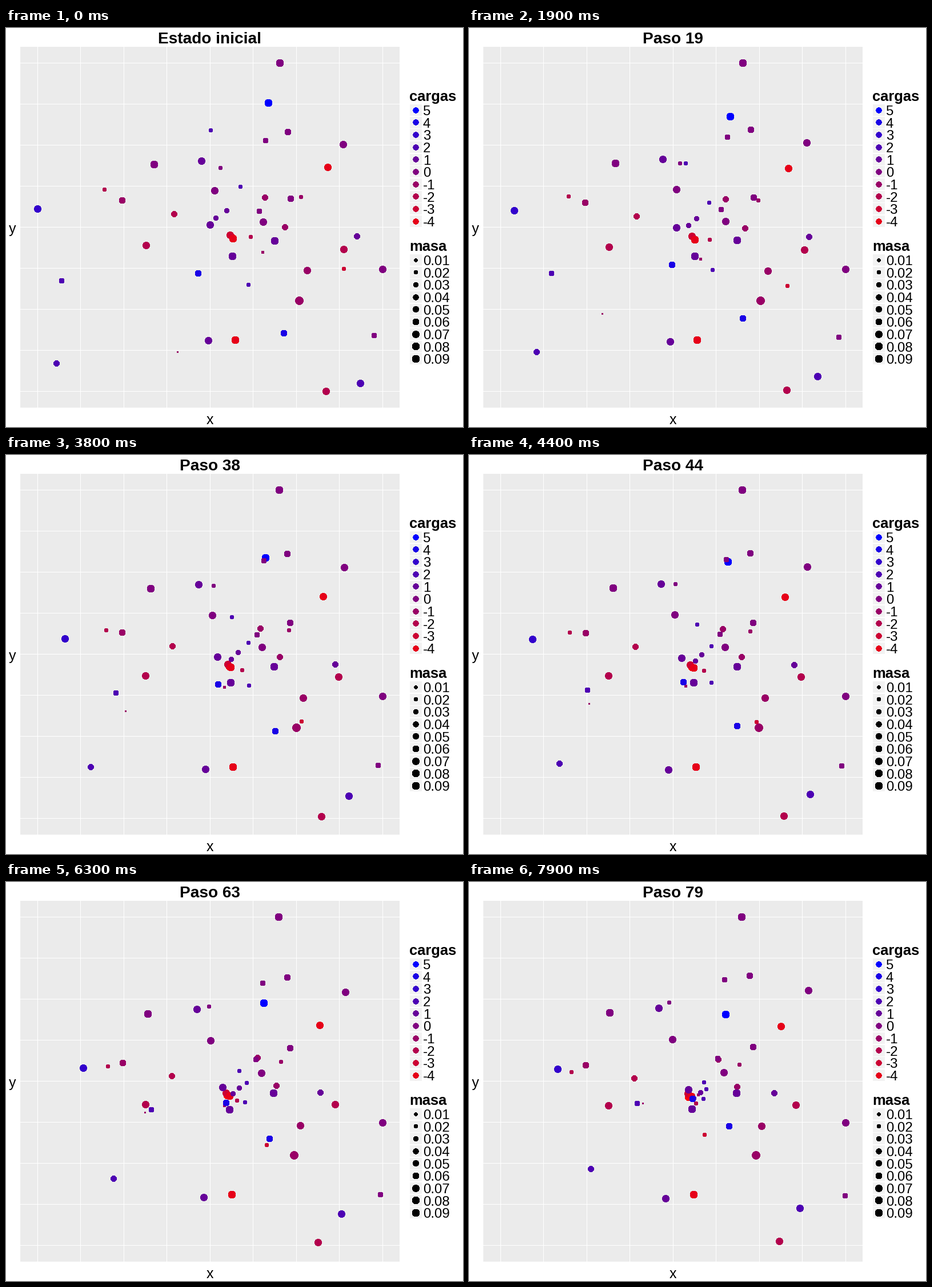
Write a matplotlib script that moves like this. It is 800x700 px and loops after 8 s.

```python
import numpy as np
import matplotlib.pyplot as plt
from matplotlib.animation import FuncAnimation
from matplotlib.patches import Rectangle

W, H, DPI = 800, 700, 100
PX = 72 / DPI
STEPS, MID = 80, 44 / 79
WALLS = (55, 61), (659, 637)
T = np.linspace(0, 1, STEPS)[:, None]

plt.rcParams["font.family"] = "Liberation Sans"
fig = plt.figure(figsize=(W / DPI, H / DPI), dpi=DPI, facecolor="white")
ax = fig.add_axes([0, 0, 1, 1])
ax.set(xlim=(0, W), ylim=(H, 0))
ax.axis("off")

paths, radii, colors = [], [], []


def charge_color(q):
    t = (5 - q) / 10
    return t, 0, 1 - t


def box(x, y, w, h, color):
    ax.add_patch(Rectangle((x, y), w, h, fc=color, lw=0, antialiased=False))


def label(x, y, s, size, **kw):
    return ax.text(x, y, s, fontsize=size * PX, va="baseline", **kw)


def dots(xy, r, c):
    sizes = (2 * np.asarray(r) * PX) ** 2
    return ax.scatter(*(np.transpose(xy) + 0.5), s=sizes, c=c, linewidths=0,
                      antialiased=False, snap=False, zorder=3)


def legend(title, top, labels, r, c):
    label(706, top - 5, title, 25.5, weight="bold")
    ys = []
    for i, s in enumerate(labels):
        y = top + 21.65 * i
        box(707, round(y) + 1, 21, 20, "#f2f2f2")
        label(730, y + 20, s, 24)
        ys.append(round(y + 10.8))
    dots([(717, y) for y in ys], r, c)


def add(q, r, path):
    paths.append(np.clip(path, *WALLS))
    radii.append(r)
    colors.append(charge_color(q))


def lean(x, y):
    """Negative bodies sag towards the lower left of the middle."""
    return -9 - 0.05 * (x - 400), 8 - 0.04 * (y - 370) - 0.025 * (x - 400)


def spread(x, y):
    """Nearly neutral bodies are pushed outwards."""
    return -4 + 0.06 * (x - 450), -7 + 0.06 * (y - 320)


def drift(field, q, *rows):
    """Steady motion along a field; light bodies go further."""
    for r, x, y in rows:
        add(q, r, (x, y) + T * np.array(field(x, y)) * (6 / r) ** 2)


def seek(q, r, start, end, via=None):
    """Run to an end point, on a parabola if a halfway point is given."""
    a, b = np.array(start), np.array(end)
    path = a + (b - a) * T
    if via:
        bend = np.array(via) - a - (b - a) * MID
        path = path + bend * T * (1 - T) / (MID * (1 - MID))
    add(q, r, path)


# Panel and grid
box(25, 33, 664, 633, "#ebebeb")
for i in range(9):
    box(int(55.4 + 75.5 * i), 33, 1, 633, "white")
    box(25, 61 + 72 * i, 664, 1, "white")

title = label(357, 27, "", 28, weight="bold", ha="center")
label(357, 695, "x", 25, ha="center")
label(11, 360, "y", 25, ha="center")

charges = range(5, -5, -1)
legend("cargas", 133, [str(q) for q in charges], 4.6,
       [charge_color(q) for q in charges])
masses = np.arange(1, 10) / 100
legend("masa", 396, [f"{m:.2f}" for m in masses],
       0.8 + 5.7 * np.sqrt(masses / 0.09), "black")

# Bodies: radius and start, painted from negative to neutral
drift(lean, -5, (5, 396, 366))
drift(lean, -3, (6, 392, 363))
drift(lean, -4, (6.5, 397, 369), (6, 563, 244), (6.5, 401, 547))
drift(lean, -2, (3.5, 172, 283), (5, 294, 326), (6, 245, 381),
      (3.5, 428, 366), (6, 591, 388), (6, 560, 637))
drift(lean, -1, (5.5, 203, 302), (5, 453, 297), (3.5, 516, 296),
      (5, 488, 349), (7, 513, 478), (6, 527, 425))
seek(-3, 3, (591, 422), (412, 443), via=(503, 468))
seek(-1, 2.5, (449, 393), (401, 373), via=(379, 405))
seek(-1, 1.2, (300, 568), (304, 388), via=(210, 436))

drift(spread, 1, (6, 342, 233), (6.5, 470, 373), (6.5, 396, 400), (6, 354, 548))
seek(1, 4, (386, 320), (405, 369), via=(407, 350))
seek(1, 4, (367, 333), (393, 379), via=(396, 361))
seek(1, 6, (357, 345), (384, 364))
seek(1, 5, (614, 365), (534, 370))
seek(2, 3.5, (358, 179), (411, 351), via=(399, 297))
seek(2, 3.5, (410, 278), (415, 363), via=(424, 335))
seek(2, 3.5, (424, 450), (410, 380), via=(424, 399))
seek(2, 6, (620, 623), (579, 572))
seek(2, 4.5, (97, 443), (294, 388))
seek(2, 5, (88, 588), (213, 503))
seek(3, 6, (55, 317), (155, 328))
seek(4, 5.5, (336, 430), (391, 380), via=(375, 398))
seek(4, 5.5, (486, 535), (455, 428))
seek(5, 6.5, (459, 131), (449, 232))

drift(spread, 0, (6.5, 479, 61), (5.5, 493, 182), (4.5, 454, 197),
      (6, 590, 204), (6.5, 259, 239), (3.5, 375, 245), (6, 365, 285),
      (5.5, 498, 299), (4.5, 443, 321), (6, 450, 340), (6, 659, 423),
      (4.5, 644, 539))

track = np.round(np.stack(paths, axis=1))
cloud = dots(track[0], radii, colors)


def draw(i):
    title.set_text(f"Paso {i}" if i else "Estado inicial")
    cloud.set_offsets(track[i] + 0.5)
    return cloud, title


anim = FuncAnimation(fig, draw, frames=STEPS, interval=100, repeat=True,
                     repeat_delay=0, blit=False)
plt.show()
```
